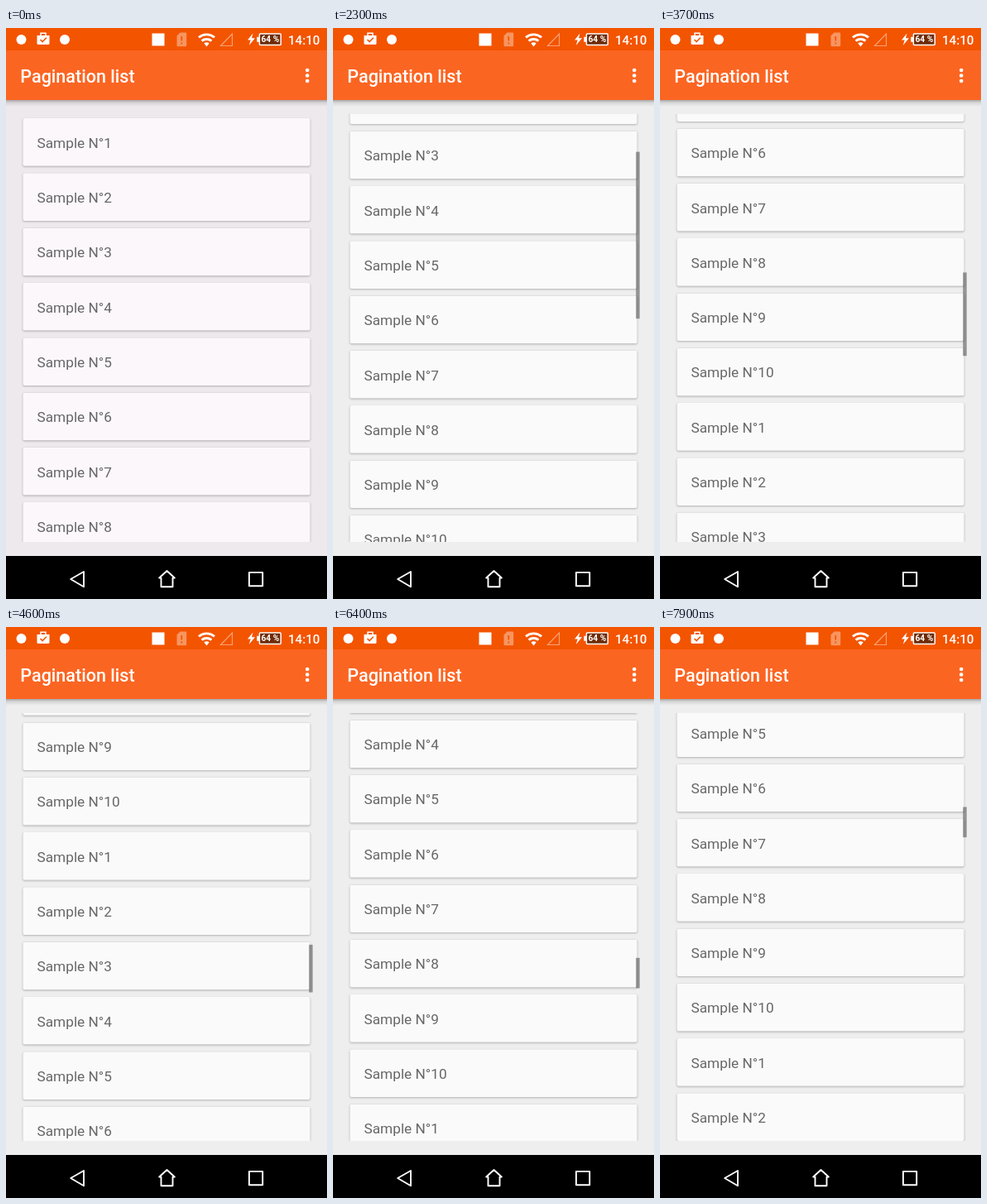
These frames come from a looping animation (388 by 690 pixels, 8 s). An HTML page:

```html
<!DOCTYPE html>
<html lang="en">
<head>
<meta charset="utf-8">
<title>Pagination list</title>
<style>
  html, body { margin: 0; width: 100%; height: 100%; overflow: hidden; background: #eee; }
  svg { display: block; width: 100vw; height: 100vh; font-family: Roboto, "Open Sans", sans-serif; }
  #cards { filter: drop-shadow(0 0 .7px rgba(0,0,0,.22)) drop-shadow(0 1.7px 1.1px rgba(0,0,0,.25)); }
  #labels { font-size: 17.24px; fill: #676767; }
</style>
</head>
<body>
<svg viewBox="0 0 388 690" xmlns="http://www.w3.org/2000/svg">
  <defs>
    <clipPath id="viewport"><rect x="16" y="104" width="356" height="517"/></clipPath>
    <linearGradient id="shade" x1="0" y1="0" x2="0" y2="1">
      <stop offset="0" stop-color="#000" stop-opacity=".3"/>
      <stop offset=".4" stop-color="#000" stop-opacity=".1"/>
      <stop offset="1" stop-color="#000" stop-opacity="0"/>
    </linearGradient>
  </defs>

  <rect id="backdrop" width="388" height="690"/>
  <g clip-path="url(#viewport)">
    <g id="cards"></g>
    <g id="labels"></g>
    <rect id="bar" x="366.2" width="4.5" fill="#000" fill-opacity=".38"/>
  </g>

  <!-- app bar -->
  <rect y="87" width="388" height="8" fill="url(#shade)"/>
  <rect width="388" height="87" fill="#fb6522"/>
  <rect width="388" height="27" fill="#f35400"/>
  <text x="17.3" y="65.8" font-size="21.56" font-weight="500" fill="#fff">Pagination list</text>
  <g fill="#fff">
    <circle cx="364.2" cy="51" r="2.3"/>
    <circle cx="364.2" cy="57.5" r="2.3"/>
    <circle cx="364.2" cy="64" r="2.3"/>
  </g>

  <!-- status bar -->
  <g fill="#fff">
    <circle cx="18.5" cy="14" r="6"/>
    <path d="M37.5 9h15v9.5q0 1.5-1.5 1.5H39q-1.5 0-1.5-1.5z"/>
    <path d="M42 9V6.3h6V9" fill="none" stroke="#fff" stroke-width="1.5"/>
    <path d="M41.5 14l2.6 2.6 4.8-4.8" fill="none" stroke="#f35400" stroke-width="1.6"/>
    <circle cx="71" cy="14" r="6"/>
    <rect x="176.5" y="6.5" width="15" height="15"/>
    <path d="M206.5 9.5l4-4h6.500q1.200 0 1.200 1.200V21q0 1.200-1.200 1.200h-9.300q-1.200 0-1.200-1.200z" opacity=".38"/>
    <path d="M212.300 10v5.500m0 2v2" stroke="#f35400" stroke-width="1.700"/>
    <path d="M242.500 22.500l-3.200-4a5 5 0 0 1 6.400 0z"/>
    <g fill="none" stroke="#fff" stroke-width="2.900">
      <path d="M236.600 15.600a9.200 9.200 0 0 1 11.800 0"/>
      <path d="M233 11.300a14.800 14.800 0 0 1 19 0"/>
    </g>
    <path d="M273.500 7v14.500H259.500z" fill="none" stroke="#fff" stroke-width="1.200" opacity=".45"/>
    <path d="M298.500 6.500l-6.500 8h3.700l-2 6.500 7.300-8.700h-4z"/>
    <rect x="306.400" y="7.100" width="25.800" height="13.300" rx="1" fill="#6e2b08" stroke="#fff" stroke-width="1.500"/>
    <rect x="303.300" y="10.800" width="2.600" height="6"/>
    <text x="319.400" y="17.300" font-size="10.200" font-weight="700" text-anchor="middle">64 %</text>
    <text x="341" y="19.500" font-size="15.100" font-weight="500">14:10</text>
  </g>

  <!-- navigation bar -->
  <rect y="638" width="388" height="52" fill="#000"/>
  <g fill="none" stroke="#fff" stroke-width="1.900" stroke-linejoin="round">
    <path d="M94 657v18.200L78.200 666z"/>
    <path d="M194.500 656l9.300 8.500h-2.300v10.700h-14V664.500h-2.300z"/>
    <rect x="293.900" y="657.900" width="16.300" height="16.300"/>
  </g>
</svg>

<script>
const LOOP = 8000, STEP = 100, START = 1500;
const PITCH = 66.3, PAGE = 10, ROWS = 10;
const TOP = 104, HEIGHT = 517, FIRST_CARD = 109;
const PAGE_TRIGGER = 470;

// Scroll position in px over time in ms
const path = [
  [START, 0], [2300, 117], [3700, 982], [4600, 2513], [5600, 4363],
  [5900, 4600], [7200, 2760], [7900, 1601], [8000, 1450]
];
const peak = path.reduce((a, b) => b[1] > a[1] ? b : a);

const $ = id => document.getElementById(id);
function add(parent, tag, attrs) {
  const el = document.createElementNS("http://www.w3.org/2000/svg", tag);
  for (const key in attrs) el.setAttribute(key, attrs[key]);
  return parent.appendChild(el);
}

const rows = Array.from({ length: ROWS }, () => ({
  card: add($("cards"), "rect", { x: 20.3, width: 347.4, height: 57.7, rx: 2 }),
  label: add($("labels"), "text", { x: 37.5 })
}));

const slope = i => (path[i + 1][1] - path[i][1]) / (path[i + 1][0] - path[i][0]);

// Harmonic mean of neighbouring slopes keeps the curve monotone
function tangent(i) {
  if (i === 0) return 0;
  if (i === path.length - 1) return slope(i - 1);
  const a = slope(i - 1), b = slope(i);
  return a * b <= 0 ? 0 : 2 * a * b / (a + b);
}

function scrollAt(t) {
  if (t <= START) return 0;
  let i = 0;
  while (i < path.length - 2 && t >= path[i + 1][0]) i++;
  const [t0, y0] = path[i], [t1, y1] = path[i + 1];
  const d = t1 - t0, u = (t - t0) / d, v = 1 - u;
  return v * v * (1 + 2 * u) * y0 + u * u * (1 + 2 * v) * y1
    + d * u * v * (v * tangent(i) - u * tangent(i + 1));
}

function render(time) {
  const t = Math.floor(time % LOOP / STEP) * STEP;
  const scroll = scrollAt(t), moving = t > START;

  $("backdrop").setAttribute("fill", moving ? "#eeeeee" : "#eee9ed");
  $("cards").setAttribute("fill", moving ? "#fafafa" : "#fcf7fb");

  const first = Math.max(0, Math.floor(scroll / PITCH) - 1);
  rows.forEach(({ card, label }, i) => {
    const index = first + i;
    const y = FIRST_CARD + index * PITCH - scroll;
    card.setAttribute("y", y);
    label.setAttribute("y", y + 35.7);
    label.textContent = `Sample N°${index % PAGE + 1}`;
  });

  const furthest = scrollAt(Math.min(t, peak[0]));
  const pages = 2 + Math.floor(furthest / PAGE_TRIGGER);
  const ratio = HEIGHT / (pages * PAGE * PITCH);
  $("bar").setAttribute("visibility", moving ? "visible" : "hidden");
  $("bar").setAttribute("y", TOP + scroll * ratio);
  $("bar").setAttribute("height", HEIGHT * ratio);
}

const begin = performance.now();
function tick() {
  render(performance.now() - begin);
  requestAnimationFrame(tick);
}
tick();
</script>
</body>
</html>
```
